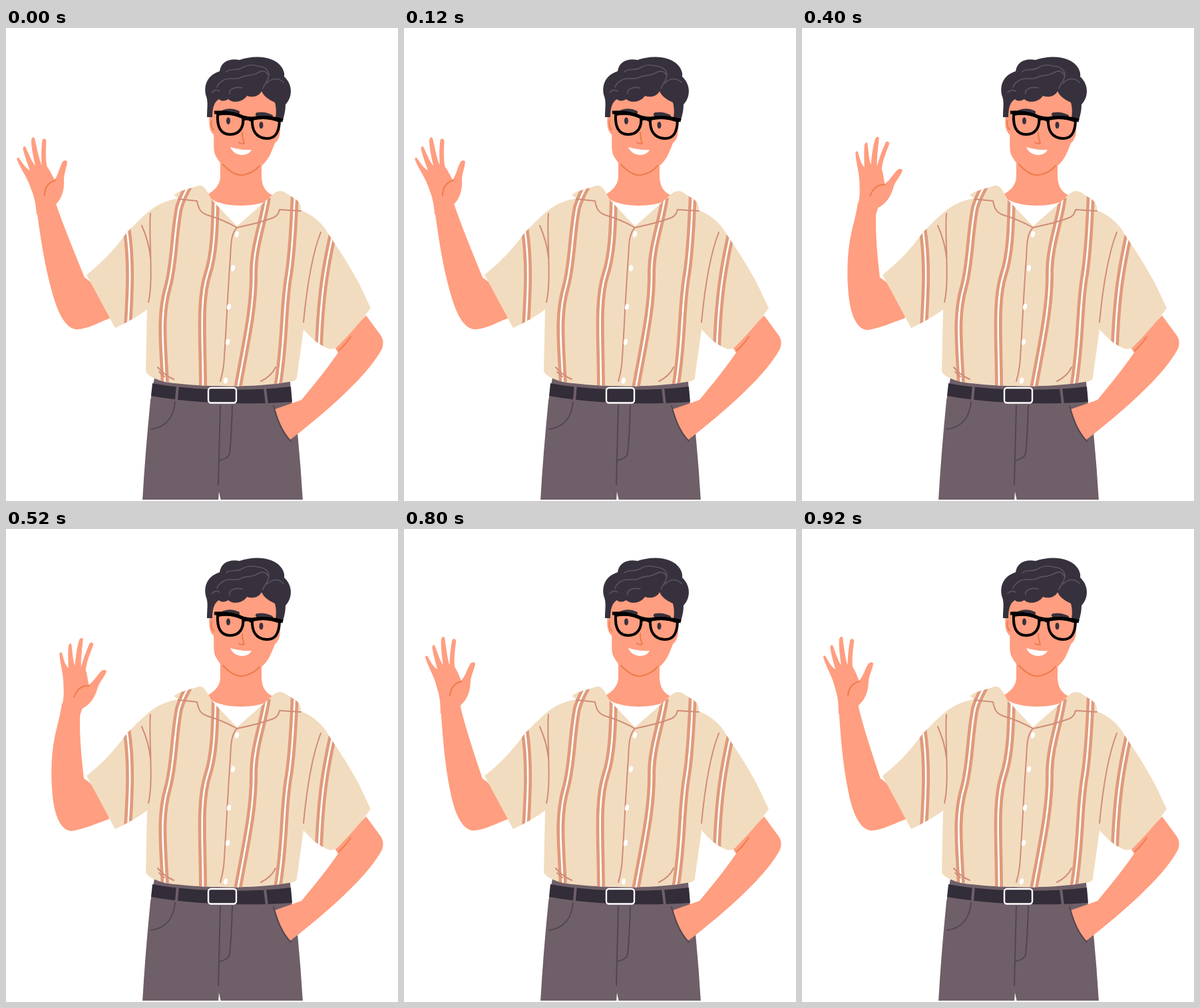
These frames come from a looping animation (589x711 px, 1000 ms). An HTML page:

```html
<!DOCTYPE html>
<html lang="en">
<head>
<meta charset="utf-8">
<title>Waving man</title>
<style>
  html, body { margin: 0; width: 100%; height: 100%; overflow: hidden; background: #fff; }
  svg { display: block; width: 100%; height: 100%; }
  .skin { fill: #ff9e80; }
  .dark { fill: #37313d; }
  .line { fill: none; stroke-width: 2; stroke-linecap: round; stroke-linejoin: round; }
  .fold { stroke: #d08c77; }
  .crease { stroke: #ee7c4c; }
  .seam { stroke: #524650; }
  .curl { stroke: #5a5461; stroke-width: 1.6; }
  .band { fill: none; stroke: #df9a7c; stroke-width: 12; }
  .pin { fill: none; stroke: #fff; stroke-width: 2.6; }
</style>
</head>
<body>
<svg viewBox="0 0 589 711">
  <defs>
    <path id="shirtShape" d="M260 246 L291 236.500 Q297 236 303 247 L309 258 L347 298 L388 262 L402 249 Q411 242 419 247 L436 258 Q444 264 443 274 C459 280 475 292 484 309 L494 324 Q512 350 530 383 L548 421 C532 443 514 463 498 479 Q489 486 480 480 C467 474 457 464 447 453 C444 477 440 502 437 526 Q436 531 425 532 C370 541 300 540 245 533 C227 530 210 522 210 515 Q211 470 212 423 C198 434 182 442 164 451 L121 371 C145 352 162 334 181 308 C196 293 208 280 221 271 Q236 260 259 256 L252 251 Z"/>
    <clipPath id="shirtClip"><use href="#shirtShape"/></clipPath>
    <clipPath id="stage"><rect width="589" height="709"/></clipPath>
  </defs>

  <g clip-path="url(#stage)">
    <!-- trousers and belt -->
    <path fill="#6f5f68" d="M223 526 L217 560 Q209 640 205 711 L319 711 L320 697 L323 711 L446 711 Q443 660 438 608 L429 560 L427 531 Z"/>
    <path class="dark" style="fill:#322d38" d="M220 534 C280 545 360 547 428 539 L430 562 C360 567 280 564 218 553 Z"/>
    <path fill="none" stroke="#6f5f68" stroke-width="4" d="M258 536 L256 559 M389 541 L392 566"/>
    <rect x="304" y="541" width="42" height="22.500" rx="4" fill="#322d38" stroke="#fff" stroke-width="2.400"/>
    <path class="line seam" d="M254 562 C252 585 240 600 218 603 M322 567 L319 686 M340 567 Q339 610 336 640 C334 646 328 648 321 650"/>

    <!-- arm resting in the pocket -->
    <path class="skin" d="M541 432 L563 462 Q569 471 565 482 C545 520 490 570 427 619 Q411 600 404 573 Q424 566 444 559 C462 537 482 513 499 488 L494 480 Z"/>
    <path class="line crease" d="M518 464 Q510 476 500 485"/>
    <path class="line seam" d="M402 568 C408 590 415 608 428 621"/>
  </g>

  <!-- waving arm -->
  <path id="forearm" class="skin"/>
  <g id="hand">
    <path class="skin" d="M45 270 Q43 254 38 243 C33 226 22 212 17 199 Q15 194 19 195 C24 201 28 210 36 214 C32 203 28 193 25.500 182 Q26 176 29 178.500 C34 188 38 200 44 207 C41 193 38 180 38 168 Q40 162 43 165.500 C46 178 49 195 53.500 206 C53 193 53 180 54.500 168 Q58 164 60.500 169 C60 182 59 196 61.500 208 C66 214 69 221 73 228 C79 220 80 210 85 201 Q90 197 92 201 C91 211 87 219 87 229 C88 245 83 257 75 265 L75 275 L46 280 Z"/>
    <path class="line crease" d="M58 252 C58 240 64 232 74 229"/>
  </g>

  <!-- neck and undershirt -->
  <path class="skin" d="M322 185 L322 225 C321 237 312 245 303 250 L312 272 L385 272 L400 251 C389 246 384 236 384 222 L384 195 Z"/>
  <path fill="#fff" d="M304 254 C322 270 373 271 397 258 L390 275 L348 301 Z"/>

  <!-- shirt -->
  <use href="#shirtShape" fill="#f2dcbf"/>
  <g id="stripes" clip-path="url(#shirtClip)"></g>
  <path class="line fold" d="M259 257 L287 260 C289 270 291 277 302 281 Q326 288 347 300 Q381 293 402 285 Q409 282 411 273 L443 275 M347 300 C338 309 338 325 337 345 C333 400 331 450 328 495 Q327 515 322 531"/>
  <path class="line fold" d="M217 279 C214 310 222 380 214 412 M204 297 Q215 322 217 345 M473 307 C460 340 452 390 447 442 M228 510 Q238 522 252 528 M230 517 L238 524 M405 510 Q399 523 383 531"/>
  <g id="buttons" fill="#fff"></g>

  <!-- head -->
  <path class="skin" d="M309 118 L306 130 C304 144 306 156 312 160 C313 171 311 181 314 190 C322 206 336 221 352 221 C371 220 388 207 396 192 C400 184 402 178 404 173 Q411 168 412 155 L413 110 L380 88 L330 95 Z"/>
  <path class="line crease" d="M326 205 C336 216 347 222 356 221 C367 219 376 213 381 207 M309 139 Q307 148 312 153"/>
  <path class="dark" d="M302 134 C302 120 304 112 301 103 C297 91 299 72 321 65 C323 51 335 45 351 48 C374 40 404 42 415 60 Q419 67 418 73 C432 86 430 105 420 115 Q420 126 416 138 L405 136 Q407 122 404 112 Q388 105 384 95 C380 103 370 105 362 102 C356 111 342 114 334 107 Q325 112 320 107 C313 111 310 120 310 134 Z"/>
  <path class="line curl" d="M331 66 C338 59 347 66 356 59 C367 53 375 57 384 58 Q394 61 395 70 C395 78 388 85 386 91 M395 72 Q389 61 379 67 C369 73 362 70 354 74 C344 80 336 72 326 79 Q319 83 317 89 M336 99 C334 91 346 88 355 90 M392 83 C401 73 412 76 417 82 M309 97 Q315 91 321 95"/>
  <path fill="none" stroke="#37313d" stroke-width="6" stroke-linecap="round" d="M327 126 Q338 122 348 127 M378 130 Q388 128 398 133"/>
  <ellipse cx="334" cy="139.500" rx="3" ry="5.300" class="dark"/>
  <ellipse cx="383.500" cy="146" rx="3" ry="5.300" class="dark"/>
  <path class="line crease" d="M355 157 Q355 166 358 173 Q354 175 350 172"/>
  <path fill="#fff" d="M337 179 Q353 184 369 183 C364 194 343 194 337 179 Z"/>
  <g fill="none" stroke="#000" stroke-width="4" stroke-linejoin="round">
    <path d="M318 130 Q337 126 356 134 C358 150 350 160 337 160 C322 160 317 148 318 130 Z"/>
    <path d="M370 137 Q391 132 411 140 C410 158 404 167 391 166 C376 165 369 154 370 137 Z"/>
    <path d="M356 138 Q363 134 370 140"/>
    <path stroke-width="5" d="M313 127 Q338 125 356 134 Q363 136 370 136 Q392 132 416 139"/>
  </g>
</svg>
<script>
  const byId = id => document.getElementById(id);

  const stripes = [
    "M274 238 Q264 256 260 270 C252 310 253 355 243 390 C230 435 237 480 239 540",
    "M315 255 C314 300 313 340 303 370 C290 410 296 470 296 540",
    "M392 255 C386 295 373 325 372 365 C373 420 360 475 348 542",
    "M434 250 C432 290 431 330 425 370 C416 420 420 470 408 540",
    "M181 300 C189 350 186 400 183 450",
    "M491 310 C480 360 473 400 470 480"
  ];
  byId("stripes").innerHTML = stripes.map(d =>
    `<path class="band" d="${d}"/><path class="pin" d="${d}"/>`).join("");

  const buttons = [[347, 310], [341, 361], [335, 419], [333, 472], [330, 530]];
  byId("buttons").innerHTML = buttons.map(([x, y]) =>
    `<ellipse cx="${x}" cy="${y}" rx="3" ry="4.700" transform="rotate(12 ${x} ${y})"/>`).join("");

  // Forearm outline at both ends of the swing, outer wrist round to inner wrist.
  const armOut = [45, 265, 51, 310, 58, 360, 71, 403, 80, 434, 92, 453, 107, 453,
    125, 452, 140, 442, 157, 436, 150, 410, 140, 390, 118, 375, 104, 340, 86, 297, 75, 264];
  const armIn = [84, 262, 79, 300, 66, 315, 69, 388, 71, 430, 82, 453, 98, 454,
    115, 452, 135, 443, 155, 436, 150, 410, 140, 390, 117, 375, 113, 340, 109, 300, 112, 265];

  const LOOP = 1000, HOLD = 200, SWING = 18.5;
  const poses = [0, 0.5, 1, 0.74, 0.25];

  function draw(time) {
    const s = poses[Math.floor((time % LOOP) / HOLD)];
    const p = armOut.map((v, i) => v + (armIn[i] - v) * s);
    byId("forearm").setAttribute("d", `M${p.slice(0, 2)} C${p.slice(2)} Z`);
    byId("hand").setAttribute("transform", `translate(${-3 * s} 0) rotate(${SWING * s} 81 398)`);
  }

  const start = performance.now();
  function tick() {
    draw(performance.now() - start);
    requestAnimationFrame(tick);
  }
  tick();
</script>
</body>
</html>
```
